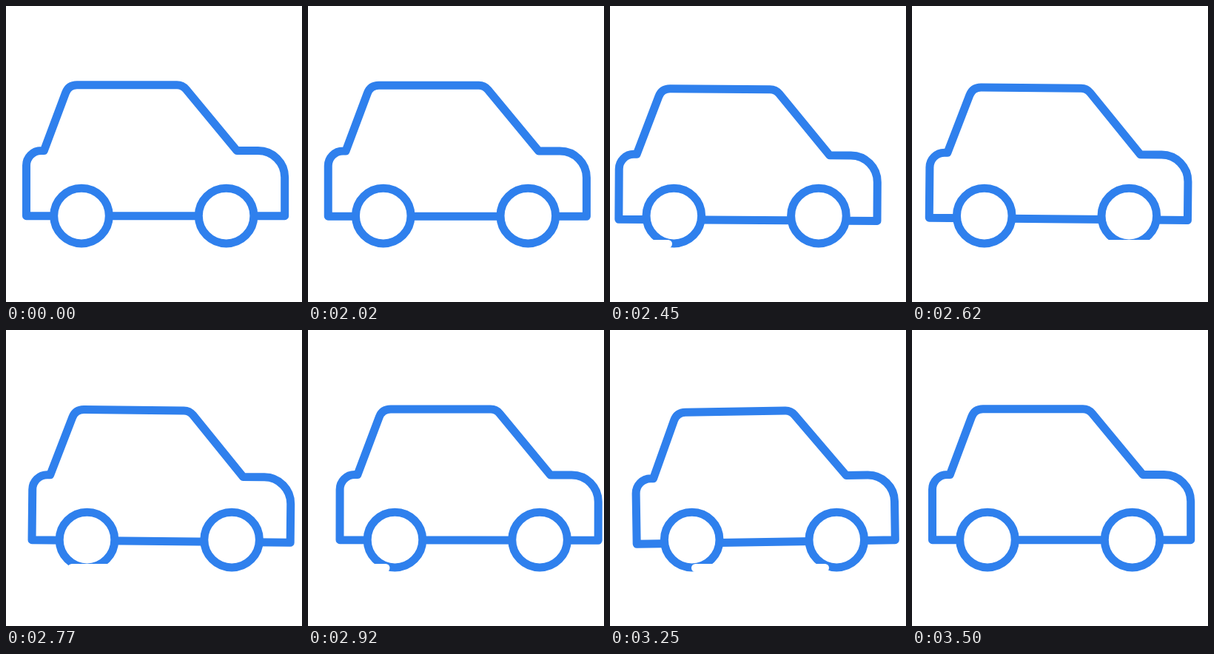
An HTML page for the animation above (3.52 s loop, 400 px wide and 400 px high).

```html
<!DOCTYPE html>
<html lang="en">
<head>
<meta charset="utf-8">
<title>Car</title>
<style>
  html, body { margin: 0; width: 100%; height: 100%; overflow: hidden; background: #fff; }
  svg { display: block; width: 100%; height: 100%; }
</style>
</head>
<body>
<svg viewBox="0 0 400 400" fill="#fff" stroke="#2f80ed" stroke-width="11" stroke-linejoin="round" stroke-linecap="round">
  <g id="car">
    <path id="body" d="M27.5 283.7V215.5A20 20 0 0 1 47.5 195.5H51.3L80.5 117.5Q84.5 106.8 96 106.8H231Q238.500 106.8 243.500 112.800L312 195.5H340.7A36 36 0 0 1 376.7 231.500V283.7Z"/>
    <circle cx="102" cy="283.6" r="37.3"/>
    <circle cx="297.6" cy="283.6" r="37.3"/>
  </g>
  <path id="dash" d="M5.5 321.5H180.500" stroke="#fff"/>
</svg>
<script>
const LOOP = 3520, START = 1995, STEP = 25, PASS = 500;
const car = document.getElementById('car');
const body = document.getElementById('body');
const dash = document.getElementById('dash');

const ease = p => (1 - Math.cos(Math.PI * p)) / 2;
const hump = (t, from, to) =>
  t > from && t < to ? Math.sin(Math.PI * (t - from) / (to - from)) : 0;

// Sway: back, forward, home
const SWAY = [[0, 0], [325, -18.5], [1010, 16.8], [1500, 0]];
function sway(t) {
  const i = Math.max(1, SWAY.findIndex(([end]) => t <= end));
  const [t0, x0] = SWAY[i - 1], [t1, x1] = SWAY[i];
  return x0 + (x1 - x0) * ease((t - t0) / (t1 - t0));
}

function draw(now) {
  const elapsed = now % LOOP - START;
  const t = Math.min(1500, Math.max(0, Math.floor(elapsed / STEP) * STEP));
  const rear = 4.9 * hump(t, 0, 750) + 5.5 * hump(t, 1000, 1500);
  const front = 6.7 * hump(t, 0, 950);
  const tilt = Math.atan((front - rear) / 349) * 180 / Math.PI;

  car.setAttribute('transform', `translate(${sway(t)})`);
  body.setAttribute('transform',
    `translate(0 ${(front + rear) / 2}) rotate(${tilt} 202 284)`);
  // White road dash sweeping left across the wheels
  dash.setAttribute('transform', `translate(${375 - 530 * (t % PASS) / PASS})`);
}

function tick() {
  draw(performance.now());
  requestAnimationFrame(tick);
}
tick();
</script>
</body>
</html>
```
